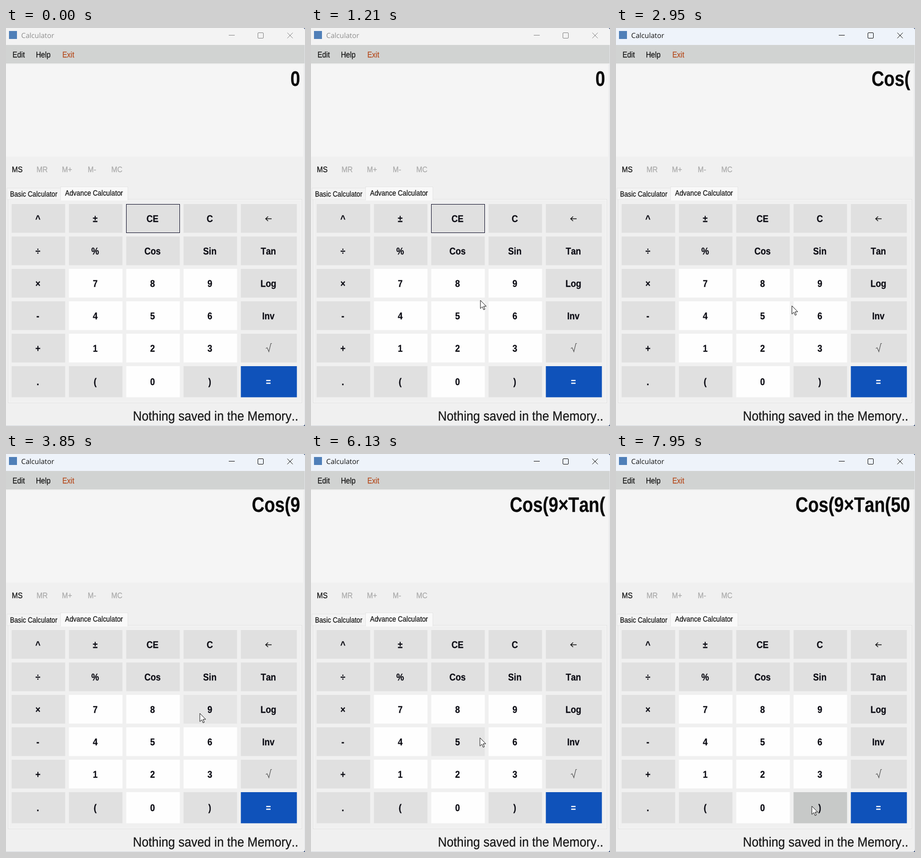
These frames come from a looping animation (600 px wide and 798 px high, 8 s). An HTML page:

```html
<!DOCTYPE html>
<html lang="en">
<head>
<meta charset="utf-8">
<title>Calculator</title>
<style>
html, body { margin: 0; width: 100%; height: 100%; overflow: hidden; background: #f0f0f0; }
svg { display: block; width: 100vw; height: 100vh; }
text { font-family: "Liberation Sans", Arial, sans-serif; font-kerning: none; text-rendering: geometricPrecision; white-space: pre; }
.title { font-family: "Open Sans", sans-serif; }
.bold { font-weight: 700; }
</style>
</head>
<body>
<svg id="stage" viewBox="0 0 600 798" preserveAspectRatio="none"></svg>
<script>
const NS = "http://www.w3.org/2000/svg";
const stage = document.getElementById("stage");
const LOOP = 8000, TICK = 67.3;

function add(tag, attrs, content) {
  const el = document.createElementNS(NS, tag);
  for (const name in attrs) el.setAttribute(name, attrs[name]);
  if (content !== undefined) el.textContent = content;
  return stage.appendChild(el);
}
const rect = (x, y, width, height, fill, stroke = "none") => add("rect", { x, y, width, height, fill, stroke });
const path = (d, stroke, width = 1) => add("path", { d, stroke, "stroke-width": width, fill: "none" });
// All interface lettering is slightly narrow and a touch heavy.
const label = (x, y, str, size, narrow, fill, more) => add("text", {
  transform: `translate(${x} ${y}) scale(${narrow} 1)`,
  "font-size": size, fill, stroke: fill, "stroke-width": 0.25, ...more
}, str);

// Window frame
const titleBar = rect(0, 0, 600, 34, "#f3f3f3");
rect(6, 6, 16, 16, "#4f7fb8");
const title = add("text", { x: 30.5, y: 20, "font-size": 14.1, class: "title" }, "Calculator");
const controls = ["M447 14.5h12", "M507 9.5h8q1.5 0 1.5 1.5v8q0 1.5-1.5 1.5h-8q-1.5 0-1.5-1.5v-8q0-1.5 1.5-1.5z",
  "M564.5 9.500l11 11m0-11l-11 11"].map(d => path(d, "#111"));
rect(0, 34, 600, 37, "#d1d3d2");
label(13, 59, "Edit", 16.5, 0.87, "#111");
label(60, 59, "Help", 16.5, 0.87, "#111");
label(113, 59, "Exit", 16.5, 0.87, "#b5481a");

// Display and memory row
rect(0, 73, 596, 185, "#f5f5f5");
const display = label(590.3, 116, "0", 42, 0.832, "#080808", { class: "bold", "text-anchor": "end" });
["MS", "MR", "M+", "M-", "MC"].forEach((str, i) =>
  label(22.500 + i * 50, 289, str, 16, 0.9, i ? "#a9a9a9" : "#111", { "text-anchor": "middle" }));

// Tabs
rect(4.5, 343.5, 589, 408, "#f0f0f0", "#e0e0e0");
rect(5.5, 344.5, 587, 406, "none", "#f8f8f8");
rect(2, 321, 108, 23, "#f3f3f3", "#e5e5e5");
rect(109.5, 318.5, 135, 26, "#f9f9f9", "#e5e5e5");
rect(110, 343, 134, 3, "#f9f9f9");
label(8, 338, "Basic Calculator", 15.3, 0.86, "#111");
label(118.5, 336, "Advance Calculator", 15.3, 0.875, "#111");

// Keys
const GRAY = { rest: "#e0e0e0", hover: "#c7c9c8" };
const WHITE = { rest: "#fefefe", hover: "#e5e5e5" };
const BLUE = { rest: "#0f52ba", hover: "#0d49a6" };
const rows = ["^ ± CE C ←", "÷ % Cos Sin Tan", "× 7 8 9 Log", "- 4 5 6 Inv", "+ 1 2 3 √", ". ( 0 ) ="];
const drawn = {
  "←": () => path("M533 382.5h-12m5-4.5l-5 4.500l5 4.5", "#111", 1.4),
  "√": () => path("M521.5 642.500l2.5-1.500l3.500 8l4-16.500h2", "#555", 1.2)
};
const keys = rows.flatMap((row, r) => row.split(" ").map((name, c) => {
  const x = 11.3 + c * 115, y = 353 + r * 65;
  const w = c === 4 ? 112.4 : 107.4, h = r === 5 ? 62.4 : 57.6;
  const tone = name === "=" ? BLUE : /\d/.test(name) ? WHITE : GRAY;
  const el = rect(x, y, w, h, tone.rest);
  if (drawn[name]) drawn[name]();
  else label(x + w / 2 - 1, y + h / 2 + 7, name, 19.5, 0.885, name === "=" ? "#fff" : "#0c0c14",
    { class: "bold", "text-anchor": "middle" });
  return { x, y, w, h, tone, el };
}));
const focusRing = rect(241.5, 353.5, 107, 57, "none", "#10102a");

label(254.8, 787, "Nothing saved in the Memory..", 26.5, 0.923, "#151515");
rect(0, 797, 600, 1, "#d5d9df");
rect(599, 34, 1, 764, "#e1e4e8");
add("path", { d: "M600 0v4q0-4-4-4zM600 798v-5q0 5-5 5z", fill: "#1d3566" });

// Pointer and click highlight
const pointer = add("path", {
  d: "M0 0V16.500L3.900 12.900L6.500 19L9 17.900L6.400 12H11.700Z",
  fill: "#fff", stroke: "#111", "stroke-linejoin": "round"
});
const glow = add("circle", { r: 15, fill: "#ff0", "fill-opacity": 0.47 });

// Each move glides to a spot; a tap there puts its result on the display.
const ENTER = 270, ACTIVATE = 1900;
const entry = { x: 540, y: 640 };
const moves = [
  { from: 270, to: 404, x: 402, y: 388 },
  { from: 404, to: 605, x: 331, y: 532 },
  { from: 605, to: 1077, x: 347, y: 563 },
  { from: 1077, to: 1615, x: 305, y: 453, tap: [ACTIVATE, 2100], result: "Cos(" },
  { from: 2557, to: 2960, x: 357, y: 565 },
  { from: 2960, to: 3365, x: 389, y: 520, tap: [3640, 3850], result: "Cos(9" },
  { from: 3971, to: 4845, x: 509, y: 459, tap: [5070, 5330], result: "Cos(9×Tan(" },
  { from: 5586, to: 6124, x: 339, y: 569, tap: [6410, 6590], result: "Cos(9×Tan(5" },
  { from: 6730, to: 7268, x: 320, y: 692, tap: [7480, 7680], result: "Cos(9×Tan(50" },
  { from: 7672, to: 7941, x: 393, y: 706 }
];
const taps = moves.filter(m => m.tap);
const ease = k => k * k * (3 - 2 * k);

function pointerAt(t) {
  let { x, y } = entry;
  for (const m of moves) {
    const k = ease(Math.min(1, Math.max(0, (t - m.from) / (m.to - m.from))));
    x += (m.x - x) * k;
    y += (m.y - y) * k;
  }
  return [Math.round(x), Math.round(y)];
}
const show = (el, on) => { el.style.display = on ? "" : "none"; };

function draw(t) {
  const shown = t >= ENTER, active = t >= ACTIVATE;
  // The screen refreshes about fifteen times a second.
  const [x, y] = pointerAt(Math.floor((t + 7) / TICK) * TICK);

  titleBar.setAttribute("fill", active ? "#eef3fa" : "#f3f3f3");
  title.setAttribute("fill", active ? "#111" : "#8d8d8d");
  controls.forEach(c => c.setAttribute("stroke", active ? "#111" : "#858585"));
  show(focusRing, !active);

  display.textContent = taps.reduce((str, m) => t >= m.tap[1] ? m.result : str, "0");
  for (const k of keys) {
    const over = shown && x >= k.x && x < k.x + k.w && y >= k.y && y < k.y + k.h;
    k.el.setAttribute("fill", over ? k.tone.hover : k.tone.rest);
  }

  for (const el of [pointer, glow]) el.setAttribute("transform", `translate(${x} ${y})`);
  show(pointer, shown);
  show(glow, taps.some(m => t >= m.tap[0] && t < m.tap[1]));
}

const start = performance.now();
function frame() {
  draw((performance.now() - start) % LOOP);
  requestAnimationFrame(frame);
}
frame();
</script>
</body>
</html>
```
